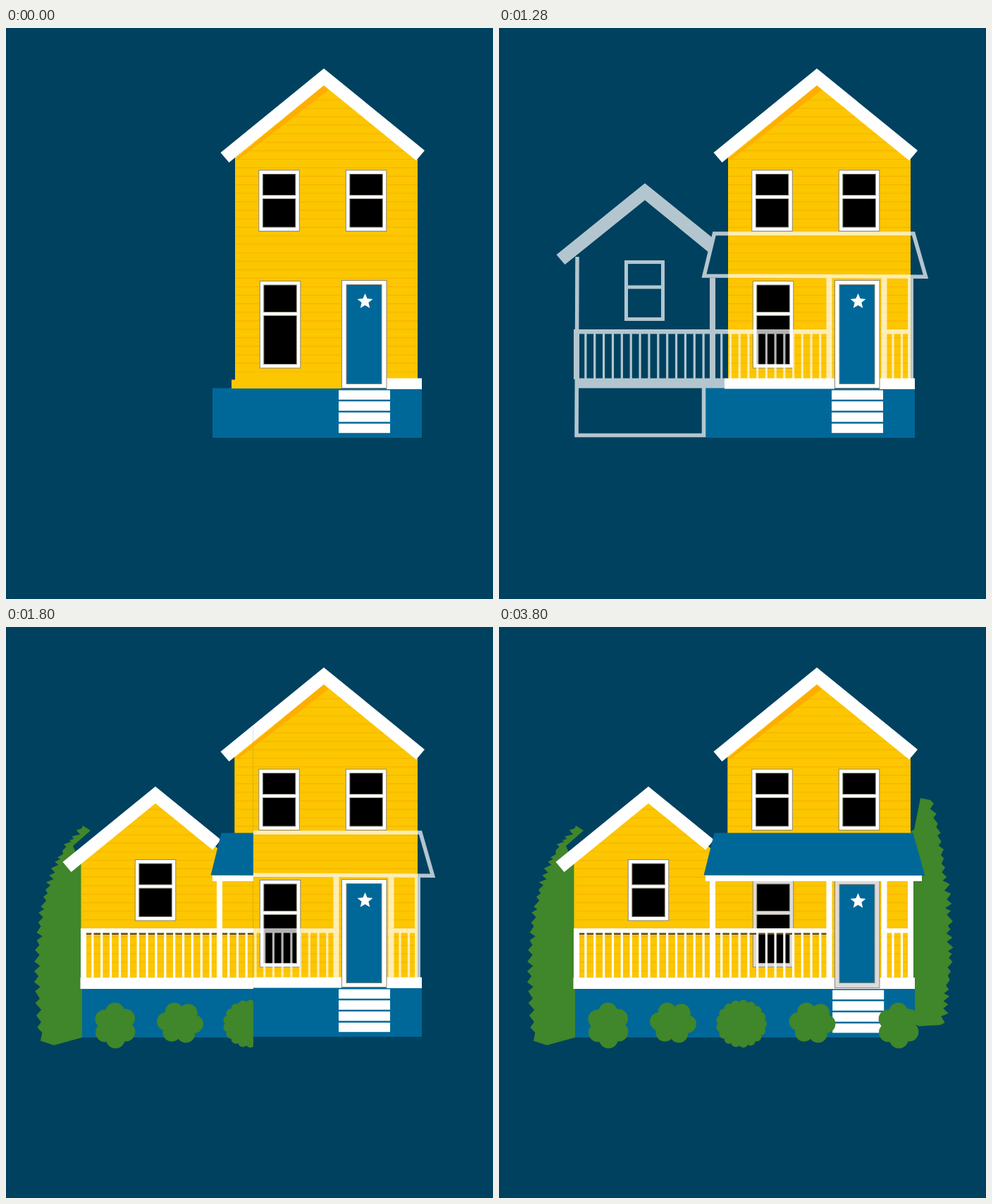
These frames come from a looping animation (691x811 px, 3.84 s). An HTML page:

```html
<!DOCTYPE html>
<html lang="en">
<head>
<meta charset="utf-8">
<title>House</title>
<style>
  html, body { margin: 0; width: 100%; height: 100%; overflow: hidden; background: #00415f; }
  svg { position: absolute; left: 0; top: 0; width: 691px; height: 811px; }
  #plan { animation: plan 3840ms linear infinite; }
  #built { animation: built 3840ms linear infinite; }
  @keyframes plan {
    0%, 5.2083% { clip-path: inset(0 100% 0 0); }
    11.4583%, 100% { clip-path: inset(0 -0.7% 0 0); }
  }
  @keyframes built {
    0%, 43.75% { clip-path: inset(0 100% 0 0); }
    50%, 100% { clip-path: inset(0 -0.7% 0 0); }
  }
</style>
</head>
<body>
<svg id="start" viewBox="0 0 691 811"></svg>
<svg id="plan" viewBox="0 0 691 811"></svg>
<svg id="built" viewBox="0 0 691 811"></svg>
<script>
const NIGHT = '#00415f', BLUE = '#006899', YELLOW = '#fcc600', ORANGE = '#ffae00';
const GREEN = '#40862a', WHITE = '#fff', SHADE = '#dedad8';
const RIM = 'stroke="#8b8878"';

// Boxes are given by their left, top, right and bottom edges.
const box = (l, t, r, b, fill = WHITE, extra = '') =>
  `<rect x="${l}" y="${t}" width="${r - l}" height="${b - t}" fill="${fill}" ${extra}/>`;
const poly = (points, fill = WHITE) => `<polygon points="${points}" fill="${fill}"/>`;
const ball = (x, y, rx, ry = rx) =>
  `<ellipse cx="${x}" cy="${y}" rx="${rx}" ry="${ry}" fill="${GREEN}"/>`;
const outline = (d, width) =>
  `<path d="${d}" fill="none" stroke="${WHITE}" stroke-width="${width}"/>`;
const list = (n, fn) => Array.from({ length: n }, (_, i) => fn(i));
const times = (n, fn) => list(n, fn).join('');
const show = (id, ...parts) => document.getElementById(id).innerHTML = parts.join('');

function seeded(seed) {
  return () => (seed = seed * 16807 % 2147483647) / 2147483647;
}

const siding = times(34, i =>
  `<path d="M100 ${102 + i * 12.07}H590" stroke="#f8b300" stroke-width="1.2"/>`);

function wall(id, points) {
  return `<clipPath id="${id}">${poly(points)}</clipPath>` +
    poly(points, YELLOW) + `<g clip-path="url(#${id})">${siding}</g>`;
}

// A gable roof: peak, drop to the eaves on both sides, thickness.
function gable(x, y, left, right, thick = 24) {
  const slope = 0.815, cut = 12;
  const at = (dx, dy) => `${x + dx},${y + dy + Math.abs(dx) * slope}`;
  return poly([at(0, 0), at(right, 0), at(right - cut, thick), at(0, thick),
               at(cut - left, thick), at(-left, 0)].join(' '));
}

function sash(x, y, height, split, frame = WHITE) {
  const pane = (t, b) => box(x + 5.5, t, x + 52, b, '#000', RIM);
  return box(x, y, x + 57.5, y + height, frame, RIM) +
    pane(y + 5.5, y + split) + pane(y + split + 5, y + height - 5.5);
}

function star(cx, cy, size) {
  return poly(list(10, i => {
    const a = i * Math.PI / 5, r = i % 2 ? size * 0.45 : size;
    return `${cx + r * Math.sin(a)},${cy - r * Math.cos(a)}`;
  }).join(' '));
}

const door = (frame, dy) =>
  box(476.5, 358.5, 540, 511.5 + dy, frame, RIM) +
  box(483, 364.5 + dy, 533, 505.5, BLUE, RIM) + star(509.5, 388.5 + dy, 11.5);

const steps = d => times(4, i => {
  const top = 514.5 + d + i * 15.8;
  return box(472 + d, top, 545 + d, top + 13.3);
});

function house(id, left, frame = WHITE) {
  return wall(id, `${left},184 451,79 584,187 584,512 ${left},512`) +
    poly(`451,81 458,88 329,187 ${left},187`, ORANGE) +
    gable(451, 57.5, 146.5, 143) +
    sash(358.8, 202, 86.5, 35.5) + sash(482.3, 202, 86.5, 35.5) +
    sash(360.3, 359.5, 123.5, 44, frame);
}

// Posts carry the porch; balusters fill each bay evenly.
function railing() {
  const posts = [110, 303, 468.5, 546.5, 584], doorway = 2;
  return posts.map((x, i) => {
    const post = box(x - 4, i ? 355 : 428, x + 4, 499);
    const next = posts[i + 1];
    if (!next || i === doorway) return post;
    const n = Math.round((next - x) / 12.7), gap = (next - x) / n;
    return post + box(x - 4, 428, next + 4, 434.5) +
      times(n - 1, k => box(x + gap * (k + 1) - 1.6, 434, x + gap * (k + 1) + 1.6, 499));
  }).join('');
}

// A ragged leafy edge along a quadratic curve.
function leafy([x0, y0], [cx, cy], [x1, y1], seed) {
  const rnd = seeded(seed), n = 52;
  return list(n + 1, i => {
    const t = i / n, s = 1 - t, off = (i % 2 ? 1 : -1) * (1 + 4 * rnd());
    return `${s * s * x0 + 2 * s * t * cx + t * t * x1 + off},` +
      `${s * s * y0 + 2 * s * t * cy + t * t * y1 + rnd() * 4 - 2}`;
  }).join(' ');
}

function bush(x, y, rx, ry, lobes, r, turn = 0) {
  return ball(x, y, rx, ry) + times(lobes, i => {
    const a = turn + i * 2 * Math.PI / lobes;
    return ball(x + (rx - 1) * Math.cos(a), y + (ry - 1) * Math.sin(a), r);
  });
}

const bushes = times(5, i => {
  if (i === 2) return bush(344, 563.5, 30, 28, 17, 7);
  return i % 4
    ? bush(i < 2 ? 247 : 444.5, 562, 21, 18, 6, 13, 0.1)
    : bush(155 + i * 103, 566, 18, 20, 6, 13.5, 0.5);
});

show('start',
  box(293, 511.5, 590, 582, BLUE),
  house('main', 325),
  box(320, 499.5, 477, 512, YELLOW),
  box(540, 497.5, 590, 513),
  door(WHITE, 0), steps(0));

show('plan',
  box(320, 497.5, 476, 512.5),
  '<g opacity=".7">',
  poly('207,220.5 303,298 298,319 207,244.5 93.5,336 81.5,322'),
  outline('M111 325L110 578.5H290.5V511', 5.5),
  outline('M180.5 332.5H232.5V413.5H180.5ZM180 368H233', 5),
  box(113, 497.5, 320, 511.5),
  railing(),
  outline('M305.5 292H588L605.5 353.2L291 352Z', 5.5),
  '</g>');

show('built',
  box(0, 0, 691, 811, NIGHT),
  poly(leafy([50, 586], [26, 356], [110, 284], 7) + ' 120,289 95,311 108,340 108,583 68,594', GREEN),
  poly('580,292 589,288 598,243 ' + leafy([613, 246], [656, 415], [630, 566], 11) + ' 596,567 580,560', GREEN),
  box(108, 512, 590, 583, BLUE),
  house('mainBuilt', 324.3, SHADE),
  wall('wing', '106.5,328 212,243 300,314 325,340 325,512 106.5,512'),
  gable(212, 226.5, 131.5, 93),
  sash(183.3, 330.5, 86.5, 35.5),
  box(105.5, 498, 590, 514),
  door(SHADE, 1), steps(1.2),
  box(113, 434, 465, 437, '#5d4c22'),
  railing(),
  poly('305.5,292.5 587.5,292.5 604.5,353.5 290.5,352.5', BLUE),
  box(293, 353, 600, 361),
  bushes);
</script>
</body>
</html>
```
